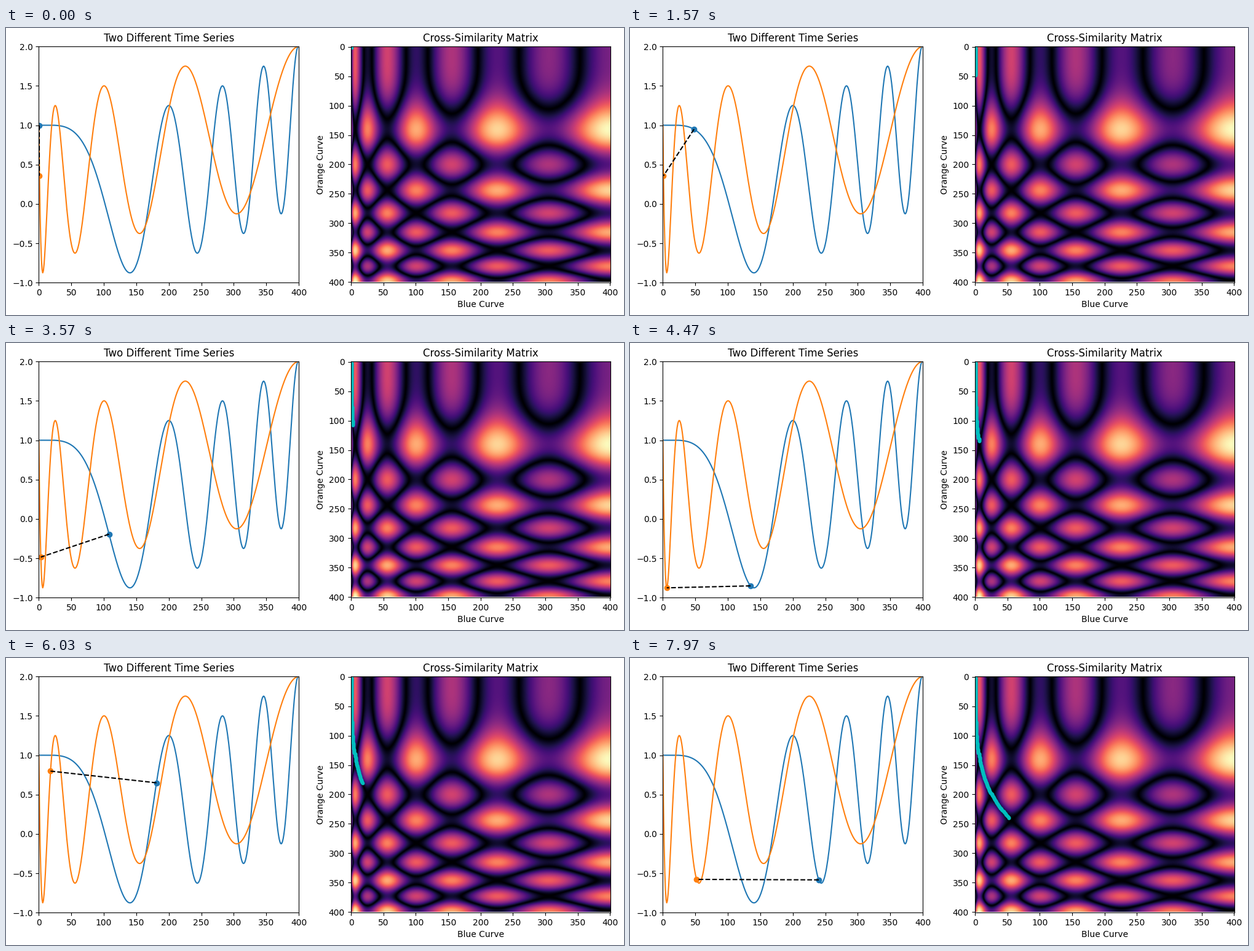
Write a matplotlib script that moves like this. It is 1005 px wide and 468 px high and loops after 8000 ms.

```python
import matplotlib.pyplot as plt
import numpy as np
from matplotlib.animation import FuncAnimation

W, H, DPI = 1005, 468, 100
N = 400
FRAMES, LOOP_MS = 240, 8000


def wave(x):
    return np.cos(8 * np.pi * x) + x


def warp_path(cost):
    """Cheapest monotone path through the cost matrix, as (row, col) pairs."""
    c = cost.tolist()
    inf = float("inf")
    total = [[inf] * (N + 1) for _ in range(N + 1)]
    total[0][0] = 0.0
    for i in range(1, N + 1):
        up, row = total[i - 1], total[i]
        for j in range(1, N + 1):
            row[j] = c[i - 1][j - 1] + min(up[j - 1], up[j], row[j - 1])
    i = j = N
    path = [(i, j)]
    while (i, j) != (1, 1):
        moves = [(i - 1, j - 1), (i - 1, j), (i, j - 1)]
        i, j = min(moves, key=lambda m: total[m[0]][m[1]])
        path.append((i, j))
    return np.array(path[::-1])


def add_panel(left, title):
    # Pixel box: 422.73 x 385, top edge at 30.2
    ax = fig.add_axes([left / W, (H - 415.2) / H, 422.73 / W, 385 / H])
    ax.set_title(title)
    return ax


t = np.linspace(0, 1, N)
blue, orange = wave(t ** 2), wave(np.sqrt(t))
cost = np.abs(blue[:, None] - orange[None, :])
path = warp_path(cost)

fig = plt.figure(figsize=(W / DPI, H / DPI), dpi=DPI, facecolor="white")

series = add_panel(53.4, "Two Different Time Series")
series.plot(blue, color="C0")
series.plot(orange, color="C1")
series.set(xlim=(0, N), ylim=(-1, 2))
blue_dot = series.scatter([0], [0], color="C0")
orange_dot = series.scatter([0], [0], color="C1")
link, = series.plot([], [], "k--")

matrix = add_panel(560.67, "Cross-Similarity Matrix")
matrix.imshow(cost, cmap="magma", aspect="auto")
matrix.set(xlabel="Blue Curve", ylabel="Orange Curve")
trail = matrix.scatter([0], [0], s=10, color="c")
matrix.set(xlim=(-0.5, N + 1), ylim=(N + 1, -0.5))


def update(k):
    i, j = path[k]
    blue_dot.set_offsets([(i, blue[i])])
    orange_dot.set_offsets([(j, orange[j])])
    link.set_data([i, j], [blue[i], orange[j]])
    trail.set_offsets(path[:k + 1, ::-1])
    return blue_dot, orange_dot, link, trail


anim = FuncAnimation(fig, update, frames=FRAMES, interval=LOOP_MS / FRAMES,
                     repeat=True, repeat_delay=0)
plt.show()
```
